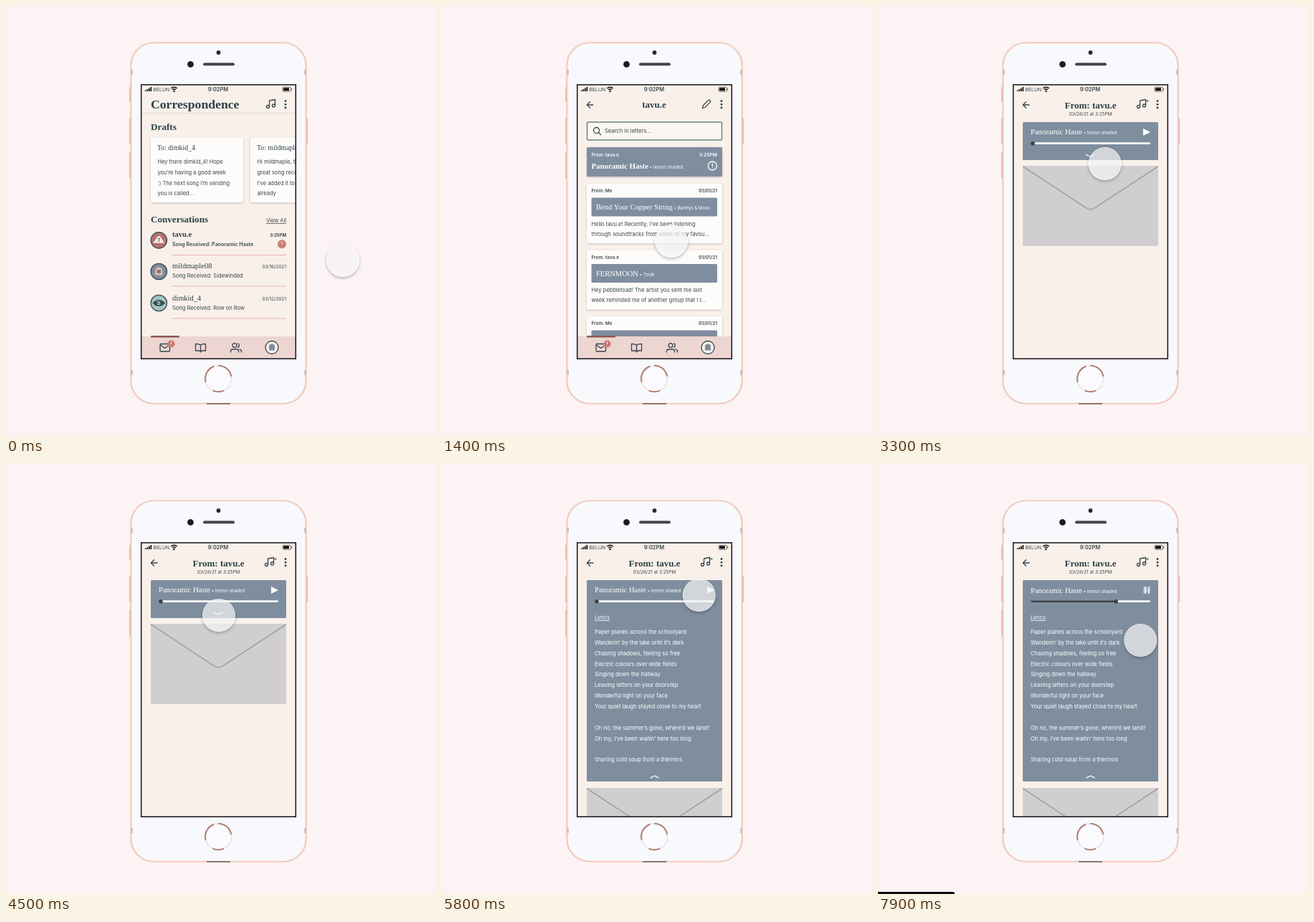
An HTML page for the animation above (8000 ms loop, 600 by 600 pixels).

```html
<!DOCTYPE html>
<html lang="en">
<head>
<meta charset="utf-8">
<title>Letter app prototype</title>
<style>
html, body { margin: 0; width: 100%; height: 100%; overflow: hidden; background: #fdf2f4; }
svg { display: block; width: 600px; height: 600px; }
text { font-family: Inter, Arial, sans-serif; fill: #39464b; white-space: pre; }
.serif { font-family: "Liberation Serif", "Times New Roman", serif; fill: #2e4046; }
.b { font-weight: 700; }
.m { font-weight: 600; }
.w { fill: #fff; }
.r { text-anchor: end; }
.c { text-anchor: middle; }
.u { text-decoration: underline; }
.line { fill: none; stroke: #37464b; stroke-width: 1.3; stroke-linecap: round; stroke-linejoin: round; }
.white { stroke: #fff; }
.card { filter: drop-shadow(0 1px 1.5px #0003); }
#cursor {
  position: absolute; left: -23px; top: -23px; width: 46px; height: 46px; box-sizing: border-box;
  border: 1.5px solid #fffd; border-radius: 50%;
  background: #f4f4f4b5 padding-box; box-shadow: 0 2px 4px #0004;
}
</style>
</head>
<body>
<svg viewBox="0 0 600 600">
  <defs>
    <clipPath id="clip"><rect x="189" y="110" width="215" height="382"/></clipPath>
    <g id="arrow"><path class="line" d="M211 138H202.500M206.500 133.800L202.300 138L206.500 142.200"/></g>
    <g id="dots" fill="#2e4046"><circle cx="390" cy="132.500" r="1.400"/><circle cx="390" cy="137.300" r="1.400"/><circle cx="390" cy="142" r="1.400"/></g>
    <g id="note" class="line"><path d="M367.500 140.500V132L375.500 130.500V139"/><circle cx="365.500" cy="140.500" r="2"/><circle cx="373.500" cy="139" r="2"/></g>
    <g id="alert"><circle r="6" fill="#c4736a"/><circle r="4.300" fill="none" stroke="#e6b3ab" stroke-width=".6"/><path d="M0 -3V.7M0 2.300V2.800" stroke="#fff" stroke-width="1.200"/></g>
  </defs>

  <g id="phone">
    <path d="M173 113V133M173 157V192M173 203V240M420 157V193" stroke="#d3a597" stroke-width="1.300"/>
    <rect x="174" y="51" width="245" height="504" rx="32" fill="#fbe6df" stroke="#e5bcae" stroke-width="1.200"/>
    <rect x="177" y="53.500" width="239" height="499" rx="29.500" fill="#f8f9fd" stroke="#fff"/>
    <path d="M175.500 89V96M417.500 89V96M175.500 508V515M417.500 508V515" stroke="#cfc3c2" stroke-width="3"/>
    <path d="M280 555H313" stroke="#6d5a55" stroke-width="1.500"/>
    <circle cx="296.500" cy="65" r="2.900" fill="#2b2a2f"/>
    <circle cx="257.500" cy="81.300" r="4.400" fill="#1c1b20"/>
    <path d="M277 81.300H317" stroke="#47474b" stroke-width="4" stroke-linecap="round"/>
    <g fill="none" stroke-width="2">
      <circle cx="296.300" cy="520" r="18.300" fill="#fafaff" stroke="#efe5e3"/>
      <circle cx="296.300" cy="520" r="18.300" stroke="#b07f71" pathLength="360" stroke-dasharray="50 50 85 20 80 75" stroke-dashoffset="-65"/>
    </g>
  </g>

  <g clip-path="url(#clip)">
    <rect x="189" y="110" width="216" height="383" fill="#f9f0ea"/>
    <g id="inbox"></g>
    <g id="thread"></g>
    <g id="tabs">
      <rect x="189" y="461" width="216" height="32" fill="#edd5d1"/>
      <rect x="202" y="460" width="40" height="2.600" rx="1" fill="#8c574f"/>
      <g class="line">
        <rect x="215" y="471.500" width="13.500" height="10.500" rx="1.200"/><path d="M215.500 473L221.700 477.500L228 473"/>
        <path d="M271.500 473.500C270 471.800 268 471.300 264.500 471.300V481H269C270.500 481 271.500 482 271.500 483C271.500 482 272.500 481 274 481H278.500V471.300C275 471.300 273 471.800 271.500 473.500V483"/>
        <circle cx="319" cy="473.500" r="2.900"/><path d="M313.500 483V481.500Q313.500 479 316.500 479H321.500Q324.500 479 324.500 481.500V483M323.500 470.800A2.900 2.900 0 0 1 323.500 476.300M326 479.200Q328.500 479.800 328.500 481.800V483"/>
        <circle cx="371" cy="476.500" r="9" fill="#f9f0ea"/>
      </g>
      <path d="M367 480.500V475.500A4 4 0 0 1 375 475.500V480.500Z" fill="#7f8e9f"/>
      <use href="#alert" transform="translate(230.500 471.500) scale(.85)"/>
    </g>
    <g id="letter"></g>
    <g id="status">
      <path d="M194.800 119V117.500M197.300 119V116M199.800 119V114.500M202.300 119V113" stroke="#111" stroke-width="1.700"/>
      <g fill="none" stroke="#111" stroke-width="1.400"><path d="M230.300 115A6 6 0 0 1 238.700 115M232.200 117.100A3.400 3.400 0 0 1 236.800 117.100"/></g>
      <circle cx="234.500" cy="119" r="1.200" fill="#111"/>
      <rect x="386" y="113.300" width="11.500" height="6" rx="1.500" fill="none" stroke="#444" stroke-width=".7"/>
      <rect x="387" y="114.300" width="8" height="4" rx=".7" fill="#111"/><path d="M398.700 115.200V117.400" stroke="#444"/>
    </g>
  </g>
  <rect x="188.700" y="109.900" width="215.600" height="382.300" fill="none" stroke="#141216" stroke-width="1.500"/>
  <path id="strip" d="M0 597H104Q107 597 107 600H0Z" fill="#0c090d"/>
</svg>
<div id="cursor"></div>
<script>
const $ = id => document.getElementById(id);
const text = (x, y, size, str, cls = '') => `<text x="${x}" y="${y}" font-size="${size}" class="${cls}">${str}</text>`;
const box = (x, y, w, h, fill, extra = '') => `<rect x="${x}" y="${y}" width="${w}" height="${h}" rx="1.500" fill="${fill}" ${extra}/>`;
const use = (id, dx = 0, dy = 0) => `<use href="#${id}" transform="translate(${dx} ${dy})"/>`;
const path = (d, cls = '', extra = '') => `<path class="line ${cls}" d="${d}" ${extra}/>`;
const rule = (x, y, end, color, width) => `<path d="M${x} ${y}H${end}" stroke="${color}" stroke-width="${width}"/>`;
const page = box(189, 122, 216, 371, '#f9f0ea');
const blue = '#7f8e9f', paper = '#fdfcfb';
const friend = 'tavu.e', song = 'Panoramic Haste', band = 'lemon shaded';
const credit = name => `<tspan style="font:400 6.2px Inter,Arial,sans-serif"> • ${name}</tspan>`;

const draft = (x, to, lines) => box(x, 184, 129, 90, paper, 'class="card"') +
  text(x + 9, 201, 9.8, 'To: ' + to, 'serif') +
  lines.map((s, i) => text(x + 9.5, 220 + i * 14.8, 7.5, s)).join('');

const row = (y, name, title, date, cls) =>
  text(232, y, 10.5, name, 'serif ' + cls) + text(391, y, cls ? 6 : 6.4, date, 'r ' + cls) +
  text(232, y + 13.3, cls ? 7.1 : 7.5, 'Song Received: ' + title, cls && 'm') +
  rule(232, y + 25.5, 391, '#e2b5a8', 1.2);

const avatar = (y, fill, mark, ink, letter, cls = '') =>
  `<circle cx="213.300" cy="${y}" r="11.200" fill="${fill}" stroke="#3d4c55" stroke-width="1.300"/>` +
  `<path d="${mark}" transform="translate(213.300 ${y})" fill="${ink}"/>` +
  text(213.3, y + 2.3, 5.5, letter, 'b c ' + cls);

$('inbox').innerHTML =
  text(202, 142.5, 17.7, 'Correspondence', 'serif b') + use('note') + use('dots') +
  rule(189, 149.5, 405, '#efd2c5', 1) +
  text(202, 173, 13.2, 'Drafts', 'serif b') +
  draft(202, 'dimkid_4', ['Hey there dimkid_4! Hope', 'you’re having a good week', ':) The next song I’m sending', 'you is called...']) +
  draft(341, 'mildmaple', ['Hi mildmaple, thanks for the', 'great song recommendation', 'I’ve added it to my playlist', 'already']) +
  text(202, 302, 13.1, 'Conversations', 'serif b') + text(391, 302, 7.4, 'View All', 'r u') +
  row(322, friend, song, '3:25PM', 'b') + use('alert', 385, 332.3) +
  row(365.5, 'mildmaple08', 'Sidewinded', '03/16/2021', '') +
  row(410.5, 'dimkid_4', 'Row on Row', '03/12/2021', '') +
  avatar(326.8, '#b4736b', 'M-8 4L-2 -5Q0 -7 2 -5L8 4Z', '#f6e6e1', 'T') +
  avatar(370.5, blue, 'M-5 5V-1A5 5 0 0 1 5 -1V5Z', '#e6bcb2', 'M') +
  avatar(414.5, '#a5c4bf', 'M-9 0Q0 -9 9 0Q0 9 -9 0Z', '#39505a', 'D', 'w');

const post = (y, from, title, by, lines) => box(202, y, 189, 83, paper, 'class="card"') +
  text(208.5, y + 12, 6.4, 'From: ' + from, 'm') + text(384, y + 12, 6.5, '01/01/21', 'r m') +
  box(208.5, y + 19.5, 175.5, 26, blue) + text(215, y + 36, 10.5, title + credit(by), 'serif w') +
  lines.map((s, i) => text(208.5, y + 58.7 + i * 14, 7.5, s)).join('');

$('thread').innerHTML = page + use('arrow') + text(296, 141.5, 13, friend, 'serif b c') + use('dots') +
  path('M363.500 142.500L364.300 138.800L371.300 131.700A1.700 1.700 0 0 1 374 134.400L367 141.500Z') +
  box(202.5, 162, 188, 25, '#fbf6f1', 'stroke="#6d877b" stroke-width="1.500"') +
  '<circle class="line" cx="215.500" cy="173.500" r="4"/>' + path('M218.500 176.500L221.500 179.500') +
  text(227, 177.3, 7.6, 'Search in letters...') +
  box(202, 197, 189, 41, blue, 'class="card"') +
  text(208.5, 209.5, 6.4, 'From: ' + friend, 'm w') + text(384, 209.5, 6.7, '3:25PM', 'm w r') +
  text(208.5, 227, 10.8, song + credit(band), 'serif b w') +
  '<circle class="line white" cx="377.300" cy="223" r="6"/>' + path('M377.300 220V223.500M377.300 225.800V226', 'white') +
  post(248, 'Me', 'Bend Your Copper String', 'Barleys &amp; Moss', [`Hello ${friend}! Recently, I’ve been listening`, 'through soundtracks from some of my favou...']) +
  post(340.5, friend, 'FERNMOON', 'Tovik', ['Hey pebbletoad! The artist you sent me last', 'week reminded me of another group that I r...']) +
  post(433, 'Me', '', '', []);

const lyrics = [
  'Paper planes across the schoolyard', 'Wanderin’ by the lake until it’s dark', 'Chasing shadows, feeling so free',
  'Electric colours over wide fields', 'Singing down the hallway', 'Leaving letters on your doorstep',
  'Wonderful light on your face', 'Your quiet laugh stayed close to my heart', '',
  'Oh no, the summer’s gone, where’d we land?', 'Oh my, I’ve been waitin’ here too long', '',
  'Sharing cold soup from a thermos'];

$('letter').innerHTML = page + use('arrow') + text(296.5, 142.5, 13, 'From: ' + friend, 'serif b c') +
  text(296.5, 153.2, 6.4, '03/26/21 at 3:25PM', 'c') + use('note', -2) +
  path('M374.500 132.500H377.500M376 131V134', '', 'style="stroke-width:.7"') + use('dots') +
  box(202, 162, 189, 53, blue, 'id="player"') +
  `<g id="song">${text(213, 179, 10.6, song + credit(band), 'serif w')}</g>` +
  '<path id="play" d="M370 171L380 176L370 181Z" fill="#fff"/>' +
  '<path id="pause" d="M373 171V181M378 171V181" stroke="#fff" stroke-width="2.800"/>' +
  box(213, 190.3, 167, 2.8, '#fff') + box(213, 190.3, 3, 2.8, '#3b4347', 'id="bar"') +
  '<circle id="knob" cy="191.700" r="2.800" fill="#3b4347"/>' +
  path('M290 207.200Q296 212 302 207.200', 'white', 'id="more"') +
  `<g id="envelope">${box(202, 223, 189, 112, '#d0ced1')}${path('M202.500 224L290 281.500Q296.500 286 303 281.500L390.500 224', '', 'style="stroke:#9fa1a4;stroke-width:1.5"')}</g>` +
  `<g id="lyrics">${text(213, 217, 7.5, 'Lyrics', 'w u')}${lyrics.map((s, i) => text(213, 237 + i * 14.85, 7.6, s, 'w')).join('')}${path('M291 437.800L296.500 435L302 437.800', 'white')}</g>`;

$('status').innerHTML += text(205.5, 119, 6.8, 'BELUN') + text(296, 119, 7.5, '9:02PM', 'm c');

// Eased 0..1 progress of t between two times
const ease = (t, from, to) => {
  const u = Math.min(1, Math.max(0, (t - from) / (to - from)));
  return u * u * (3 - 2 * u);
};

// Cursor moves: start, end, x, y
const moves = [[50, 700, 320, 328], [2250, 3100, 321, 222], [3150, 3700, 297, 211], [5200, 6020, 372, 177], [7450, 7950, 366, 248]];

function draw(t) {
  let x = 470, y = 355;
  for (const [from, to, tx, ty] of moves) {
    const k = ease(t, from, to);
    x += (tx - x) * k;
    y += (ty - y) * k;
  }
  $('cursor').style.transform = `translate(${x}px, ${y}px)`;

  $('thread').style.opacity = ease(t, 920, 1380);
  $('letter').style.opacity = ease(t, 3120, 3300);

  const open = ease(t, 4818, 5146);
  $('player').setAttribute('height', 53 + 228 * open);
  $('envelope').setAttribute('transform', `translate(0 ${229 * open})`);
  $('lyrics').style.opacity = open;
  $('more').style.opacity = 1 - open;

  const played = ease(t, 6640, 6980) * (1 - ease(t, 7750, 8170));
  $('bar').setAttribute('width', 3 + 164 * played);
  $('knob').setAttribute('cx', 216 + 164 * played);
  $('pause').style.opacity = played;
  $('play').style.opacity = 1 - played;
  $('song').setAttribute('transform', `translate(0 ${1.3 * played})`);
  $('strip').style.opacity = t < 6700 ? 0 : 0.8 + 0.2 * ease(t, 6800, 7200);
}

// The picture advances ten times a second
function frame() {
  draw(Math.floor(performance.now() % 8000 / 100) * 100);
  requestAnimationFrame(frame);
}
frame();
</script>
</body>
</html>
```
